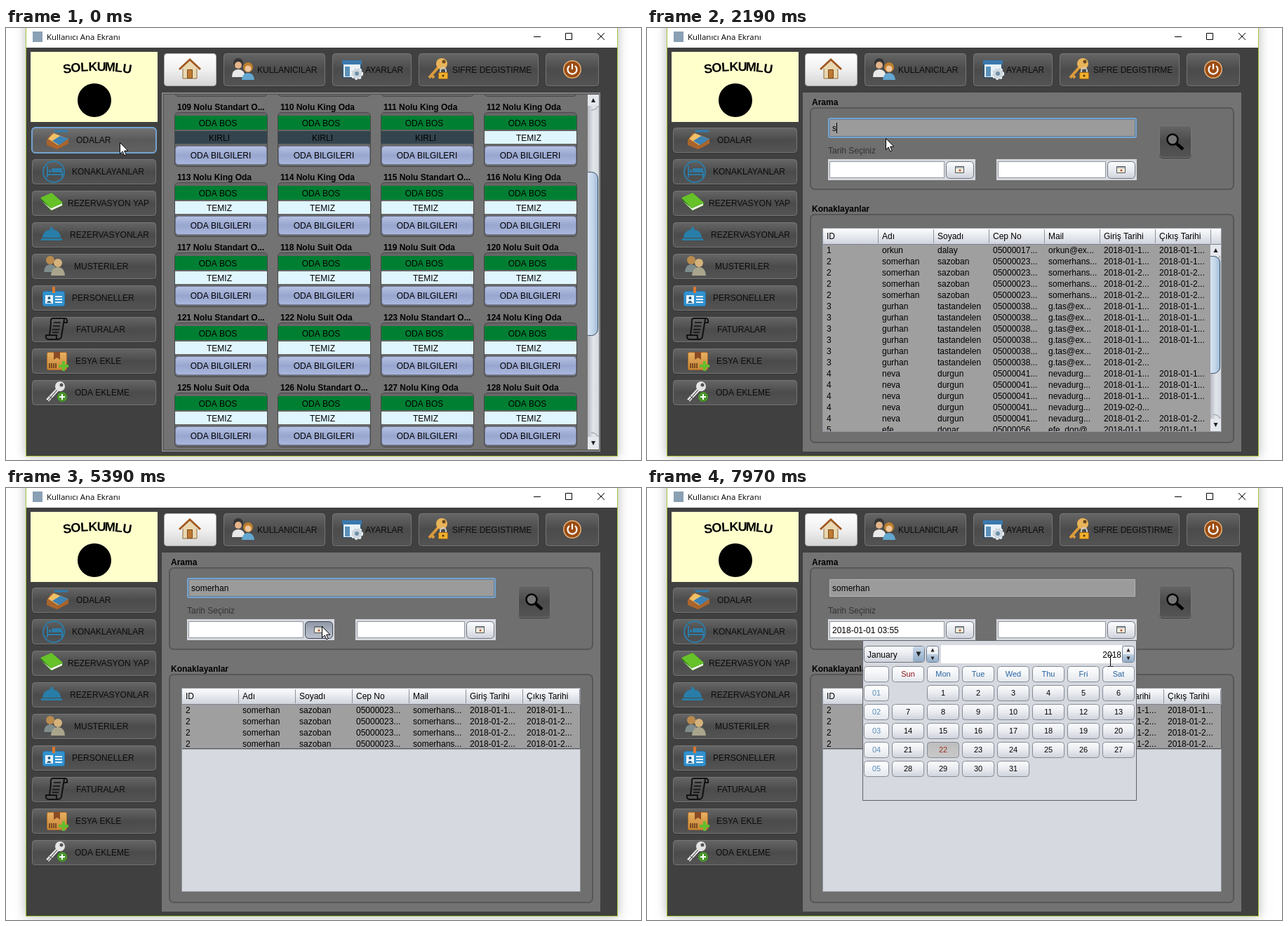
Animation, 905 px wide and 616 px high, one loop 8 s. Source, as an HTML page with a canvas:

```html
<!DOCTYPE html>
<html lang="tr">
<head>
<meta charset="utf-8">
<title>Kullanıcı Ana Ekranı</title>
<style>
html, body { margin: 0; width: 100%; height: 100%; overflow: hidden; background: #fff; }
canvas { display: block; }
</style>
</head>
<body>
<canvas width="905" height="616"></canvas>
<script>
const ctx = document.querySelector('canvas').getContext('2d');
const LOOP = 8000;
const SANS = '"Liberation Sans", Arial, sans-serif';
const LIGHT = ['#fdfdfe', '#e9ebf0', '#cdd1da'];
const PRESSED = ['#8d94a3', '#a9b0be', '#bcc2ce'];

// Pointer moves: start, end, number of steps, target x, target y
const MOVES = [
  [120, 520, 6, 160, 203], [1050, 1580, 8, 340, 157], [3290, 3600, 5, 425, 199],
  [3990, 4150, 3, 450, 203], [4450, 4830, 6, 686, 213], [4910, 5240, 5, 450, 197],
  [5790, 6400, 9, 206, 287], [6800, 7420, 9, 670, 210], [7500, 7501, 1, 664, 212],
  [7890, 7970, 2, 660, 246]
];
const QUERY = 'somerhan';
const KEY_TIMES = [2190, 2430, 2580, 2760, 2980, 3210, 3400, 3770];
const CARET_TOGGLES = [1800, 4290, 4770, 5240, 6630, 7260];

const ROOM_KINDS = 'SKKKKKSKSUUUSUSKUSKU';
const KIND_NAMES = { S: 'Standart O...', K: 'King Oda', U: 'Suit Oda' };
const HEADERS = ['ID', 'Adı', 'Soyadı', 'Cep No', 'Mail', 'Giriş Tarihi', 'Çıkış Tarihi'];
const DATES = { 1: '2018-01-1...', 2: '2018-01-2...', 9: '2019-02-0...', '-': '' };
// The last item lists the arrival and departure codes of each stay
const GUESTS = [
  ['1', 'orkun', 'dalay', '05000017...', 'orkun@ex...', '11'],
  ['2', 'somerhan', 'sazoban', '05000023...', 'somerhans...', '11 22 22 22'],
  ['3', 'gurhan', 'tastandelen', '05000038...', 'g.tas@ex...', '11 11 11 11 2- 2-'],
  ['4', 'neva', 'durgun', '05000041...', 'nevadurg...', '11 11 11 9- 22'],
  ['5', 'efe', 'donar', '05000056...', 'efe_don@...', '11']
];
const STAYS = GUESTS.flatMap(guest => guest[5].split(' ').map(
  ([from, to]) => [...guest.slice(0, 5), DATES[from], DATES[to]]));

let now = 0, mouse = [0, 0], popupX = null;

function paint(colors, x, y, w, h, across) {
  if (!Array.isArray(colors)) return colors;
  const g = across ? ctx.createLinearGradient(x, 0, x + w, 0) : ctx.createLinearGradient(0, y, 0, y + h);
  colors.forEach((color, i) => g.addColorStop(i / (colors.length - 1), color));
  return g;
}
function box(x, y, w, h, fill, stroke, r = 0, line = 1, across = false) {
  const inset = stroke ? line / 2 : 0;
  ctx.beginPath();
  ctx.roundRect(x + inset, y + inset, w - 2 * inset, h - 2 * inset, r);
  if (fill) { ctx.fillStyle = paint(fill, x, y, w, h, across); ctx.fill(); }
  if (stroke) { ctx.lineWidth = line; ctx.strokeStyle = stroke; ctx.stroke(); }
}
function text(str, x, y, { color = '#000', size = 12, bold = false, align = 'left', family = SANS } = {}) {
  ctx.font = `${bold ? 'bold ' : ''}${size}px ${family}`;
  ctx.fillStyle = color;
  ctx.textAlign = align;
  ctx.fillText(str, x, y);
}
function shape(color, d) { ctx.fillStyle = color; ctx.fill(new Path2D(d)); }
function line(color, d, width = 1) {
  ctx.strokeStyle = color;
  ctx.lineWidth = width;
  ctx.stroke(new Path2D(d));
}
function disc(color, x, y, r) {
  ctx.fillStyle = color;
  ctx.beginPath();
  ctx.arc(x, y, r, 0, 7);
  ctx.fill();
}
function clipped(x, y, w, h, draw) {
  ctx.save();
  ctx.beginPath();
  ctx.rect(x, y, w, h);
  ctx.clip();
  draw();
  ctx.restore();
}
const within = (x, y, w, h) => mouse[0] >= x && mouse[0] < x + w && mouse[1] >= y && mouse[1] < y + h;
const between = (from, to) => now >= from && now < to;

function pointerAt(t) {
  let [x, y] = [162, 163];
  for (const [from, to, steps, tx, ty] of MOVES) {
    if (t < from) break;
    const step = Math.min(steps, 1 + Math.floor((t - from) / (to - from) * (steps - 1) + 1e-6));
    const f = step / steps, eased = f * f * (3 - 2 * f);
    x += (tx - x) * eased;
    y += (ty - y) * eased;
  }
  return [Math.round(x), Math.round(y)];
}

function darkButton(x, y, w, h, focused) {
  const hover = popupX === null && within(x, y, w, h);
  box(x, y + 1, w, h, '#333', null, 5);
  box(x, y, w, h, hover ? ['#727272', '#5a5a5a', '#616161'] : ['#666', '#4b4b4b', '#545454'], '#767676', 4);
  if (focused) box(x - 1, y - 1, w + 2, h + 2, null, '#73a4d1', 5, 2);
}
function triangle(x, y, dir, size = 4) {
  shape('#222', `M${x - size} ${y - dir * size}h${2 * size}l${-size} ${dir * size * 2}z`);
}

const sideButtons = [
  ['ODALAR', 100, () => {
    shape('#a9642b', 'M58 160l7-10 24 8v7l-16 8-15-6z');
    shape('#f0c068', 'M60 158l8-8 20 8-14 9z');
    shape('#3d83b5', 'M66 161l11-7 12 4-13 9z');
    line('#2f7db0', 'M69 147h19', 3);
  }],
  ['KONAKLAYANLAR', 94, () => {
    ctx.beginPath(); ctx.arc(68, 205, 15, 0, 7);
    ctx.strokeStyle = '#2d7ca8'; ctx.lineWidth = 2; ctx.stroke();
    line('#2d7ca8', 'M59 197v16M59 209h21v4M80 209v-5', 2);
    shape('#2d7ca8', 'M65 200h15v6h-15zM61 202h3v4h-3z');
  }],
  ['REZERVASYON YAP', 88, () => {
    shape('#2f7a16', 'M49 244l15 17 17-8v-4l-16-14z');
    shape('#f2f2e8', 'M51 247l14 13 15-7v-3l-16 7z');
    shape('#66c228', 'M49 242l16-7 16 14-17 8z');
  }],
  ['REZERVASYONLAR', 91, () => {
    shape('#287ea8', 'M52 299a13 12 0 0 1 26 0zM50 300h30v3h-30zM63 284h4v4h-4z');
  }],
  ['MUSTERILER', 97, () => {
    disc('#b98b4e', 63, 331, 6); shape('#7e8c8c', 'M54 348q1-11 9-11t9 11z');
    disc('#d5b27c', 74, 335, 6); shape('#a9a58d', 'M64 353q1-12 10-12t10 12z');
  }],
  ['PERSONELLER', 94, () => {
    box(52, 375, 32, 22, '#3292cf', '#2377ad', 3);
    line('#d9772f', 'M68 369v9', 4);
    box(56, 381, 11, 12, '#e9f3fa'); disc('#245b82', 61.5, 385, 2);
    shape('#245b82', 'M58 392q3-6 7 0z');
    line('#e9f3fa', 'M70 383h10M70 387h10M70 391h10', 2);
  }],
  ['FATURALAR', 100, () => {
    line('#111', 'M66 414h19q3 2 2 6h-5M66 414q-3 1-2 7l-2 17M83 415l-4 25q-1 4-5 4h-14q-4-1-3-6h15q-1 5 2 6', 2);
    line('#111', 'M68 420h10M67 425h10M66 430h10M66 434h9', 1.5);
  }],
  ['ESYA EKLE', 99, () => {
    box(58, 462, 29, 26, ['#e6b162', '#c98534'], '#a7692a', 2);
    shape('#8c4b24', 'M68 462h9v11l-4-3-5 3z');
    line('#5b3518', 'M62 478v7M65 478v7M68 478v7M71 478v7', 1.5);
    line('#63bd2c', 'M82 475v14M75 482h14', 4);
  }],
  ['ODA EKLEME', 98, () => {
    line('#e4e4e4', 'M74 515l-15 16', 5);
    line('#222', 'M73 516l-14 16M62 525l4 4', 1);
    disc('#e4e4e4', 77, 511, 7); disc('#555', 79, 509, 2.5);
    disc('#48962a', 80, 526, 7); line('#fff', 'M80 522v8M76 526h8', 2);
  }]
];
const topButtons = [
  [310, 145, 'KULLANICILAR', 358, () => {
    disc('#343434', 331, 50, 7); disc('#e5b48a', 331, 53, 5);
    shape('#e9e9e9', 'M322 70q0-11 9-11t10 11z');
    disc('#bd7f2c', 345, 56, 7); disc('#f0c69c', 345, 58, 4.5);
    shape('#64a7d0', 'M336 74q1-10 9-10t9 10z');
  }],
  [465, 113, 'AYARLAR', 512, () => {
    box(479, 46, 28, 26, '#e8f1f8', '#34526b', 1, 2);
    box(479, 46, 28, 6, '#3b79ad'); box(483, 55, 7, 14, '#5a90b8');
    disc('#cfd8df', 500, 65, 8); disc('#6f91ab', 500, 65, 3);
    ctx.setLineDash([3, 3]);
    ctx.beginPath(); ctx.arc(500, 65, 8, 0, 7); ctx.lineWidth = 2; ctx.strokeStyle = '#f4f7f9'; ctx.stroke();
    ctx.setLineDash([]);
  }],
  [588, 171, 'SIFRE DEGISTIRME', 636, () => {
    line('#d99a3c', 'M617 55l-14 16M606 67l4 4', 4);
    disc('#e8b45a', 621, 51, 8); disc('#6a4a1f', 624, 48, 2.5);
    line('#ccc', 'M619 64v-3a4 4 0 0 1 8 0v3', 2);
    box(616, 63, 14, 10, '#f0b02c', '#a86b12', 1); disc('#4c3008', 623, 68, 1.5);
  }],
  [769, 76, '', 0, () => {
    disc('#e6b37c', 807, 59, 13); disc('#9b4c12', 807, 59, 11.5);
    line('#fff', 'M803 54a6.5 6.5 0 1 0 8 0M807 51v8', 2.2);
  }]
];

function drawBanner() {
  box(35, 34, 181, 100, '#ffffcc');
  [...'SOLKUMLU'].forEach((letter, i) => {
    const d = i - 3.5;
    ctx.save();
    ctx.translate(130 + d * 12, 61 + d * d * 0.25);
    ctx.rotate(d * 0.04);
    text(letter, 0, 0, { size: 18, bold: true, align: 'center' });
    ctx.restore();
  });
  disc('#000', 126, 103, 24);
}

function drawWindow() {
  box(0, 0, 905, 616, '#fff');
  ctx.save();
  ctx.shadowColor = 'rgba(0,0,0,.28)';
  ctx.shadowBlur = 14;
  box(28, -20, 844, 631, '#a4c639');
  ctx.restore();
  box(29, 0, 842, 28, '#fff');
  box(29, 28, 842, 582, '#404040');
  box(38, 5, 14, 15, '#8aa0b4');
  text('Kullanıcı Ana Ekranı', 58, 17, { family: '"Open Sans", "Noto Sans", sans-serif', size: 11.5 });
  line('#000', 'M752 12.5h10M797.5 7.5h9v9h-9zM843 7l10 10M853 7l-10 10');
  drawBanner();
  box(225, 36, 75, 47, ['#fff', '#f0f0f0', '#d4d4d4'], '#aaa', 4);
  shape('#e9d7b0', 'M252 57l10-10 10 10v15h-20z');
  line('#a25a21', 'M247 59l15-14 15 14', 3);
  line('#8d6a3c', 'M252 58v14h20v-14');
  box(258, 59, 8, 13, '#bc7a34', '#7c4a1a');
  for (const [x, w, label, tx, icon] of topButtons) {
    darkButton(x, 36, w, 47);
    icon();
    text(label, tx, 64, { color: '#0c0c0c' });
  }
  const focusRow = now < 740 ? 0 : now < 1800 ? 1 : -1;
  sideButtons.forEach(([label, x, icon], i) => {
    const y = 142 + 45 * i;
    darkButton(37, y, 177, 36, i === focusRow);
    icon();
    text(label, x, y + 22, { color: '#0c0c0c' });
  });
  box(222, 92, 625, 512, '#737373');
}

function scrollbar(x, y, w, h, thumbY, thumbH) {
  box(x, y, w, h, ['#b5b9c0', '#e2e5ea', '#d4d8de'], null, 0, 1, true);
  box(x, y, w, 16, '#e4e7ec');
  box(x, y + h - 18, w, 18, '#e4e7ec');
  line('#8c9199', `M${x + w - 1} ${y + 16}q-3 6-10 6M${x + w - 1} ${y + h - 18}q-3-6-10-6`);
  triangle(x + w / 2, y + 8, -1, 3);
  triangle(x + w / 2, y + h - 9, 1, 3);
  clipped(x, thumbY, w, thumbH, () =>
    box(x - 8, thumbY, w + 7, thumbH, ['#89a4c2', '#d8e5f3', '#c3d6ea', '#9fb9d4'], '#364d67', 9, 1, true));
}

function drawRooms() {
  box(222, 92, 625, 512, null, '#8d9096');
  box(224, 94, 621, 508, '#737373', '#555');
  clipped(225, 95, 604, 506, () => {
    for (let i = -4; i < 20; i++) {
      const x = 241 + 147 * ((i + 4) % 4), y = 122 + 100 * Math.floor(i / 4), mid = x + 61;
      const dirty = i < 3;
      box(x - 1, y - 2, 133, 78, '#666', '#484848', 5);
      text(`${109 + i} Nolu ${KIND_NAMES[ROOM_KINDS[i]]}`, x + 3, y - 5, { bold: true });
      box(x, y + 3, 131, 20, '#007f33');
      text('ODA BOS', mid, y + 18, { align: 'center' });
      box(x, y + 25, 131, 18, dirty ? '#33444e' : '#e0f6ff');
      text(dirty ? 'KIRLI' : 'TEMIZ', x + 63, y + 39, { align: 'center' });
      box(x, y + 46, 131, 27, ['#b7c3e3', '#98a6cf', '#abb8de'], '#747e9c', 4);
      text('ODA BILGILERI', x + 65, y + 64, { align: 'center' });
    }
  });
  scrollbar(829, 95, 16, 506, 205, 234);
}

function dateField(x, w, value, pressed) {
  box(x, 187, w, 30, '#d6d9df');
  box(x + 2, 190, w - 46, 24, '#fff', '#92969e');
  text(value, x + 6, 207);
  const bx = x + w - 42;
  const lit = popupX === null && within(bx, 190, 40, 25);
  box(bx, 190, 40, 25, pressed ? PRESSED : lit ? ['#fff', '#f3f5f8', '#dfe3ea'] : LIGHT, pressed ? '#3b4252' : '#70757e', 5);
  box(bx + 13, 197, 13, 10, '#f3f0dc', '#555');
  box(bx + 14, 198, 11, 2, '#a9b3bd');
  disc('#b9473b', bx + 20, 203, 1.5);
}

function drawSearch() {
  text('Arama', 235, 110, { bold: true });
  box(232, 113, 605, 118, '#6f6f6f', '#575757', 6, 2);
  const focused = between(1800, 5540) || between(6630, 7820);
  box(260, 130, 436, 25, '#9b9b9b', focused ? '#6d7b89' : '#b3b3b3');
  if (focused) box(258, 128, 440, 29, null, '#73a4d1', 2, 2);
  const typed = QUERY.slice(0, KEY_TIMES.filter(t => now >= t).length);
  if (now < 1800) text('Ara', 264, 147, { color: '#3c3c3c' });
  else text(typed, 264, 147);
  if (focused && CARET_TOGGLES.filter(t => now >= t).length % 2)
    box(264 + Math.round(ctx.measureText(typed).width), 135, 1, 15, '#000');
  text('Tarih Seçiniz', 258, 179, { color: '#333' });
  dateField(258, 210, now < 6630 ? '' : '2018-01-01 03:55', between(5390, 5540));
  dateField(498, 200, '', between(7740, 7820));
  darkButton(730, 139, 46, 46);
  ctx.beginPath(); ctx.arc(749, 159, 7.5, 0, 7);
  ctx.fillStyle = '#777'; ctx.fill();
  ctx.strokeStyle = '#000'; ctx.lineWidth = 2.5; ctx.stroke();
  line('#000', 'M755 165l9 8', 4.5);
}

function drawTable() {
  text('Konaklayanlar', 235, 262, { bold: true });
  box(232, 265, 605, 327, '#6f6f6f', '#575757', 6, 2);
  const ids = now < 2430 ? '12345' : now < 2580 ? '235' : '2';
  const rows = STAYS.filter(stay => ids.includes(stay[0]));
  const scrolls = rows.length > 16, col = scrolls ? 79 : 81;
  const width = scrolls ? 552 : 568;
  box(250, 285, 569, 291, '#d6d9df', '#8f949c');
  box(251, 286, 567, 22, ['#fdfdfe', '#e6e9ee', '#d0d4dc']);
  box(251, 308, 567, 1, '#7d828b');
  HEADERS.forEach((label, i) => {
    text(label, 256 + col * i, 301);
    box(Math.min(250 + col * (i + 1), 817), 287, 1, 20, '#8d929b');
  });
  clipped(251, 309, width, 266, () => {
    box(251, 309, width, rows.length * 16, '#9f9f9f');
    if (!scrolls) box(250, 308, width + 1, rows.length * 16, null, '#585c63');
    rows.forEach((row, r) => row.forEach((cell, i) => text(cell, 256 + col * i, 321 + 16 * r)));
  });
  if (scrolls) scrollbar(803, 309, 15, 266, 325, 168);
}

function drawPopup(x) {
  ctx.save();
  ctx.translate(x, 0);
  const key = (kx, y, w, label, color, fill = LIGHT) => {
    box(kx, y, w, 23, fill, '#858b96', 4);
    text(label, kx + w / 2, y + 15, { size: 11, align: 'center', color });
  };
  const spinner = sx => {
    box(sx, 225, 18, 24, LIGHT, '#6d7f95', 3);
    box(sx + 1, 237, 16, 11, ['#bfd0e2', '#93adc8'], null, 2);
    triangle(sx + 9, 231, -1, 2.5);
    triangle(sx + 9, 243, 1, 2.5);
  };
  box(0, 217, 391, 229, '#d6d9df', '#5d6066');
  box(2, 225, 87, 24, LIGHT, '#737983', 4);
  box(72, 226, 16, 22, ['#c9d8e7', '#8faac6'], null, 3);
  triangle(80, 237, 1, 3.5);
  text('January', 7, 242);
  spinner(91);
  box(112, 224, 258, 26, '#fff');
  text('2018', 369, 242, { align: 'right' });
  spinner(370);
  const paper = ['#fff', '#f2f4f7', '#e2e5ea'];
  key(2, 254, 36, '', '#000', paper);
  ['Sun', 'Mon', 'Tue', 'Wed', 'Thu', 'Fri', 'Sat'].forEach((day, i) =>
    key(42 + 50 * i, 254, 46, day, i ? '#2763a0' : '#8f1414', paper));
  for (let week = 0; week < 5; week++) {
    const y = 281 + 27 * week;
    key(2, y, 36, '0' + (week + 1), '#5b8db8', paper);
    for (let i = 0; i < 7; i++) {
      const day = week * 7 + i, kx = 42 + 50 * i;
      if (day < 1 || day > 31) continue;
      const lit = within(x + kx, y, 46, 23);
      const fill = lit && between(6480, 6630) ? PRESSED : day === 22 ? ['#bdbdbd', '#c9c9c9']
        : lit ? ['#fff', '#f6f8fa', '#e3e7ee'] : LIGHT;
      key(kx, y, 46, day, day === 22 ? '#a33222' : '#000', fill);
    }
  }
  ctx.restore();
}

function drawPointer() {
  const [x, y] = mouse;
  const inSearch = within(258, 128, 440, 29);
  const overText = now >= 890 && (inSearch || within(258, 188, 168, 28) || within(498, 188, 156, 28)
    || popupX !== null && within(popupX + 112, 224, 258, 26));
  ctx.save();
  ctx.translate(x, y);
  if (overText) {
    line(inSearch ? '#5c5c5c' : '#000', 'M-3 -7.5h2.5l1 1l1-1h2.5M.5-6.5v14M-3 8.5h2.5l1-1l1 1h2.5');
  } else {
    const arrow = 'M.5.5v16l3.7-3.6 2.6 6 2.4-1-2.5-5.8h5.1z';
    shape('#fff', arrow);
    line('#000', arrow);
  }
  ctx.restore();
}

function frame(time) {
  now = time % LOOP;
  mouse = pointerAt(now);
  popupX = between(5540, 6630) ? 76 : now >= 7820 ? 307 : null;
  drawWindow();
  if (now < 890) drawRooms();
  else {
    drawSearch();
    drawTable();
  }
  if (popupX !== null) drawPopup(popupX);
  drawPointer();
  requestAnimationFrame(frame);
}
requestAnimationFrame(frame);
</script>
</body>
</html>
```
